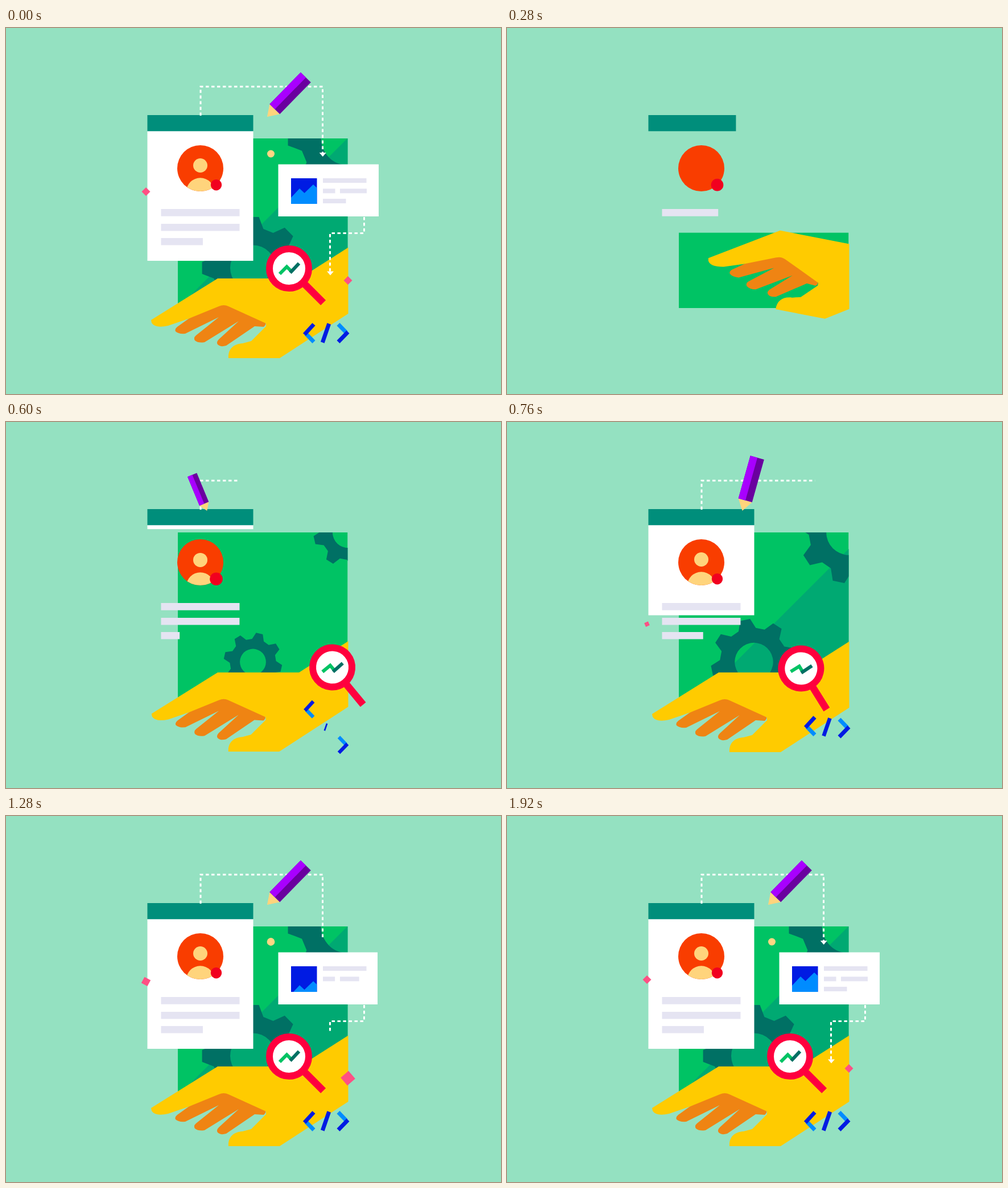
An HTML page for the animation above (3.08 s loop, 870x643 px).

```html
<!DOCTYPE html>
<html lang="en">
<head>
<meta charset="utf-8">
<title>Helping hand</title>
<style>
  html, body { margin: 0; width: 100%; height: 100%; overflow: hidden; background: #94e1c1; }
  svg { display: block; width: 100%; height: 100%; }
  .dash { fill: none; stroke: #fff; stroke-width: 3; stroke-dasharray: 5.5 4.5; }
  .reveal { fill: none; stroke: #fff; stroke-width: 8; }
  .row { fill: #e5e4f2; }
  .gear { fill: #007064; fill-rule: evenodd; }
  .gem { fill: #ff5084; }
  .code { stroke-width: 7; }
  .navy { stroke: #001be3; }
  .sky { stroke: #008cff; }
</style>
</head>
<body>
<svg viewBox="0 0 870 643">
  <defs>
    <clipPath id="panelClip"><rect x="302" y="194" width="298.5" height="298"/></clipPath>
    <clipPath id="armClip"><rect width="601.5" height="643"/></clipPath>
    <clipPath id="avatarClip"><circle cx="341.5" cy="246.5" r="40.5"/></clipPath>
    <clipPath id="photoClip"><rect x="501" y="264" width="45.5" height="45"/></clipPath>
    <mask id="mask1" maskUnits="userSpaceOnUse" x="0" y="0" width="870" height="643">
      <path id="reveal1" class="reveal" pathLength="1" d="M342 154V103H556.5V219"/>
    </mask>
    <mask id="mask2" maskUnits="userSpaceOnUse" x="0" y="0" width="870" height="643">
      <path id="reveal2" class="reveal" pathLength="1" d="M629.5 332V360.5H569.5V428"/>
    </mask>
  </defs>

  <g clip-path="url(#panelClip)">
    <rect id="panel" x="302" width="298.5" fill="#00c364"/>
    <path id="shade" d="M602 192V800H-6Z" fill="#00a972"/>
    <path id="gear1" class="gear"/>
    <path id="gear2" class="gear"/>
  </g>
  <circle id="bead" r="6.5" fill="#ffd684"/>

  <g clip-path="url(#armClip)">
    <g id="hand">
      <path fill="#ef8413" d="M322 510L301 525Q296 529 298 533Q303 538 315 537L374 508L334 540Q329 544 332 549Q338 554 349 552L409 515L374 547Q369 552 372 556Q377 561 387 558L437 524L453 525Q460 520 453 514L384 480Z"/>
      <path fill="#ffcb00" d="M255 513L372 440H516L760 285V399L481 580H391C390 564 400 555 416 554L431 550L457 524V519L391 489Q383 485 374 489L320 511L285 523Q262 528 256 518Z"/>
    </g>
  </g>

  <rect id="card" x="248.5" y="181" width="186" fill="#fff"/>
  <rect class="grow" x="248.5" y="153" width="186" height="28.3" fill="#008e7b" data-start="120" data-length="540"/>
  <circle id="avatar" r="40.5" fill="#f93d00"/>
  <g clip-path="url(#avatarClip)">
    <g id="person" fill="#ffd47c">
      <circle cx="341.5" cy="241.5" r="12.5"/>
      <circle cx="341.5" cy="288" r="24.7"/>
    </g>
  </g>
  <circle id="badge" r="9.7" fill="#f1001f"/>
  <rect class="grow row" x="272.5" y="318" width="138" height="12.7" data-start="200"/>
  <rect class="grow row" x="272.5" y="344" width="138" height="12.5" data-start="320"/>
  <rect class="grow row" x="272.5" y="369" width="73.5" height="12.5" data-start="560"/>

  <path class="dash" mask="url(#mask1)" d="M342 154V103H556.5V219"/>
  <path id="arrow1" d="M-6 -3.5H6L0 3.5Z" fill="#fff"/>
  <path class="dash" mask="url(#mask2)" d="M629.5 332V360.5H569.5V428"/>
  <path id="arrow2" d="M-6 -3.5H6L0 3.5Z" fill="#fff"/>

  <rect id="note" x="478.5" y="239.5" height="91.5" fill="#fff"/>
  <rect class="grow row" x="557" y="264" width="76.5" height="8" data-start="960"/>
  <rect class="grow row" x="557" y="282.3" width="21.5" height="8" data-start="1080"/>
  <rect class="grow row" x="587" y="282.3" width="47" height="8" data-start="1200"/>
  <rect class="grow row" x="557" y="300" width="40.5" height="8" data-start="1320"/>
  <rect id="photo" x="-22.75" y="-22.5" width="45.5" height="45" fill="#001be3"/>
  <g clip-path="url(#photoClip)">
    <path id="hills" d="M501 298L516 282L524.5 290L540 275L546.5 281V309H501Z" fill="#008cff"/>
  </g>

  <g id="lens">
    <rect x="36" y="-6.3" width="49" height="12.6" fill="#ff003e" transform="rotate(45)"/>
    <circle r="34.5" fill="#fff" stroke="#ff003e" stroke-width="12"/>
    <g fill="none" stroke-width="6">
      <path d="M-16.5 9.5L-4 -3L4.5 5.5" stroke="#00c364"/>
      <path d="M2 7.5L17.5 -9" stroke="#007064"/>
    </g>
  </g>

  <g id="less" class="code">
    <path class="sky" d="M-6 1L8 15.5"/><path class="navy" d="M8 -15.5L-8.5 2.5"/>
  </g>
  <path id="slash" class="code navy" d="M5.7 -16.5L-5.7 16.5"/>
  <g id="more" class="code">
    <path class="sky" d="M-9 -15.5L5 -1"/><path class="navy" d="M-9 15.5L8 -2"/>
  </g>

  <rect id="gem1" class="gem" x="-5.3" y="-5.3" width="10.6" height="10.6"/>
  <rect id="gem2" class="gem" x="-5.3" y="-5.3" width="10.6" height="10.6"/>

  <g id="pencil">
    <path d="M0 0L-12.5 -19H12.5Z" fill="#ffd47c"/>
    <rect x="-12.5" y="-97" width="25" height="78" fill="#6a009f"/>
    <rect x="-12.5" y="-97" width="12.8" height="78" fill="#a800ff"/>
  </g>
</svg>
<script>
const LOOP = 3080, STEP = 40;
const $ = id => document.getElementById(id);
const attr = (id, name, value) => $(id).setAttribute(name, value);
const place = (id, x, y, scale = 1, turn = 0) =>
  attr(id, 'transform', `translate(${x} ${y}) rotate(${turn}) scale(${scale})`);

// Share of the way still to go, 1 to 0, easing out.
const left = (t, start, length, power = 5) =>
  (1 - Math.min(1, Math.max(0, (t - start) / length))) ** power;
const grown = (...args) => 1 - left(...args);

const bars = [...document.querySelectorAll('.grow')].map(rect => ({
  rect,
  width: rect.width.baseVal.value,
  start: +rect.dataset.start,
  length: +(rect.dataset.length || 360)
}));

function gearPath(teeth = 8, root = 71, tip = 90, hole = 40) {
  const points = [];
  const corner = (r, degrees) => {
    const a = degrees * Math.PI / 180;
    points.push(`${r * Math.cos(a)} ${r * Math.sin(a)}`);
  };
  for (let i = 0; i < teeth; i++) {
    const middle = i * 360 / teeth;
    corner(root, middle - 15);
    corner(tip, middle - 6.7);
    corner(tip, middle + 6.7);
    corner(root, middle + 15);
  }
  const arc = `A${hole} ${hole} 0 1 0`;
  return `M${points.join('L')}ZM${hole} 0${arc} ${-hole} 0${arc} ${hole} 0Z`;
}
document.querySelectorAll('.gear').forEach(gear => gear.setAttribute('d', gearPath()));

// Pops up larger than its final size, then settles.
function pop(id, x, y, t, start) {
  place(id, x, y, grown(t, start, 100, 1) * (1 + 1.03 * left(t, start, 540, 1.5)));
}

// Rises, spins once and shrinks to its final size.
function gem(id, x, y, t, start) {
  const rest = left(t, start + 25, 1100, 4.6);
  place(id, x, y + 72 * rest, grown(t, start, 220, 1) * (1 + 3 * rest), 45 - 360 * rest);
}

function drawHand(t) {
  const x = 350 * left(t, 160, 290, 2.2);
  const y = -231 * left(t, 160, 420, 3);
  const turn = 23 * left(t, 160, 420, 2.2);
  const scale = 1 - 0.02 * left(t, 280, 480, 1);
  attr('hand', 'transform',
    `translate(${372 + x} ${440 + y}) rotate(${turn}) scale(${scale}) translate(-372 -440)`);
}

// Flies in on an arc and swings slightly past its resting angle.
function drawLens(t) {
  const rest = left(t, 360, 760, 2);
  const x = 497.5 + 312 * left(t, 360, 760, 3.72);
  const y = 422.5 + 73 * rest - 117 * rest ** 2;
  place('lens', x, y, grown(t, 360, 80), 100.6 * rest - 190 * rest ** 2);
}

function drawCode(t) {
  const shift = 65 * left(t, 540, 400, 4.5);
  const scale = grown(t, 520, 120, 2);
  place('less', 533, 536 - shift, scale);
  place('more', 593, 536 + shift, scale);
  place('slash', 562, 536, grown(t, 560, 440));
}

function render(t) {
  const height = 298 * grown(t, 239, 370);
  attr('panel', 'y', 492 - height);
  attr('panel', 'height', height);
  place('shade', 0, 596 * left(t, 480, 620));

  const spin = left(t, 415, 750, 3);
  place('gear1', 434, 421.5, 1 - spin, -75 * spin);
  place('gear2', 601, 194, 1.18 * (1 - spin), 75 * spin);

  drawHand(t);

  for (const { rect, width, start, length } of bars)
    rect.setAttribute('width', width * grown(t, start, length));
  attr('card', 'height', 228 * grown(t, 595, 780));
  attr('note', 'width', 176.5 * grown(t, 857, 712));

  place('avatar', 341.5, 246.5, grown(t, 60, 260));
  place('person', 0, 60 * left(t, 290, 480, 4));
  pop('badge', 369.5, 275.7, t, 220);
  pop('bead', 465.5, 221, t, 820);

  attr('reveal1', 'stroke-dasharray', `${grown(t, 505, 1327)} 2`);
  attr('reveal2', 'stroke-dasharray', `${grown(t, 1050, 1127)} 2`);
  place('arrow1', 556.7, 222.5, grown(t, 1320, 160, 3));
  place('arrow2', 570, 431, grown(t, 1700, 180, 3));

  place('photo', 523.75, 286.5, grown(t, 940, 360));
  place('hills', 0, 35 * left(t, 1160, 500, 3));

  drawLens(t);
  drawCode(t);
  gem('gem1', 246, 287.5, t, 720);
  gem('gem2', 601, 443.5, t, 960);

  const rest = left(t, 520, 760, 3.15);
  place('pencil', 459 - 150 * rest, 156, grown(t, 560, 120, 3), 44.4 - 95 * rest);
}

const begin = performance.now();
function tick() {
  const t = Math.floor((performance.now() - begin) % LOOP / STEP) * STEP;
  render(t < STEP ? LOOP : t); // the loop opens on the finished picture
  requestAnimationFrame(tick);
}
tick();
</script>
</body>
</html>
```
